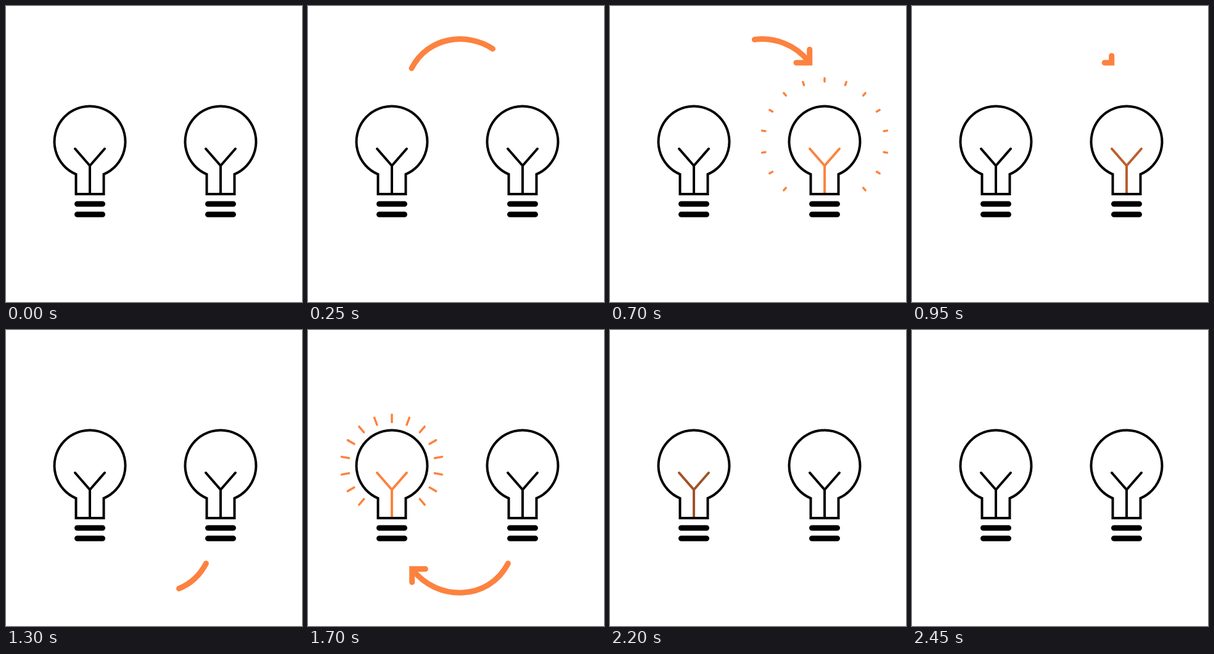
Recreate the animation shown at these times as an HTML page. Size 480 by 480 pixels, loop 2.65 s.

```html
<!DOCTYPE html>
<html lang="en">
<head>
<meta charset="utf-8">
<title>Light bulbs</title>
<style>
  html, body { margin: 0; width: 100%; height: 100%; overflow: hidden; background: #fff; }
  svg { display: block; width: 100%; height: 100%; fill: none; stroke: #000; stroke-width: 4; }
  .base, .filament, .ray, .arrow path { stroke-linecap: round; }
  .base { stroke-width: 9; }
  .ray { stroke: #fd823f; stroke-width: 3.5; }
  .arrow { stroke: #fd823f; stroke-width: 9; }
</style>
</head>
<body>
<svg viewBox="0 0 480 480">
  <defs>
    <g id="shell">
      <path d="M-22.5 52.9A57.5 57.5 0 1 1 22.5 52.9V85H-22.5Z"/>
      <path class="base" d="M-20.5 101H20.5M-20.5 118H20.5"/>
    </g>
  </defs>
</svg>
<script>
  const LOOP = 2650, STEP = 50, HALF = 1200;
  const svg = document.querySelector('svg');

  function add(parent, tag, attrs) {
    const el = document.createElementNS('http://www.w3.org/2000/svg', tag);
    for (const key in attrs) el.setAttribute(key, attrs[key]);
    return parent.appendChild(el);
  }

  const progress = (t, from, to) => Math.min(1, Math.max(0, (t - from) / (to - from)));

  function show(el, visible) {
    el.setAttribute('visibility', visible ? 'visible' : 'hidden');
  }

  // Shows the part of a unit-length path between a and b.
  function trim(path, a, b) {
    show(path, b - a > 0.001);
    path.setAttribute('stroke-dasharray', `${b - a} 2`);
    path.setAttribute('stroke-dashoffset', -a);
  }

  function makeScene(bulbX, arrowTransform, delay) {
    const arrow = add(svg, 'g', { class: 'arrow', transform: arrowTransform });
    const body = add(arrow, 'path', { pathLength: 1, d: 'M168 101C200 39.5 283 40 322 90' });
    const head = add(arrow, 'path', { pathLength: 1, d: 'M302 92H323.7V70.5' });

    const bulb = add(svg, 'g', { transform: `translate(${bulbX} 220)` });
    const filament = add(bulb, 'path', { class: 'filament', d: 'M-24 11.5L0 39L24 11.5M0 39V83' });
    add(bulb, 'use', { href: '#shell' });
    const rays = [];
    for (let angle = -140; angle <= 140; angle += 20) {
      rays.push(add(bulb, 'line', { class: 'ray', transform: `rotate(${angle})` }));
    }

    return time => {
      const t = time - delay;
      trim(body, progress(t, 525, 905), progress(t, 0, 300));

      const size = progress(t, 300, 400) - progress(t, 905, 1000);
      trim(head, 0.5 - size / 2, 0.5 + size / 2);

      const glow = progress(t, 350, 450) - progress(t, 735, 1250) ** 1.5;
      filament.style.stroke = `rgb(${[253, 130, 63].map(c => Math.round(c * glow))})`;

      const tip = 70.5 + 32.5 * progress(t, 430, 616);
      const tail = 70.5 + 32.5 * progress(t, 500, 740);
      for (const ray of rays) {
        show(ray, tip > tail);
        ray.setAttribute('y1', -tail);
        ray.setAttribute('y2', -tip);
      }
    };
  }

  const scenes = [
    makeScene(348, '', 0),
    makeScene(136, 'rotate(180 246.2 239.8)', HALF)
  ];

  const start = performance.now();
  function draw() {
    const t = (performance.now() - start) % LOOP;
    const time = Math.floor(t / STEP) * STEP;
    scenes.forEach(update => update(time));
    requestAnimationFrame(draw);
  }
  draw();
</script>
</body>
</html>
```
